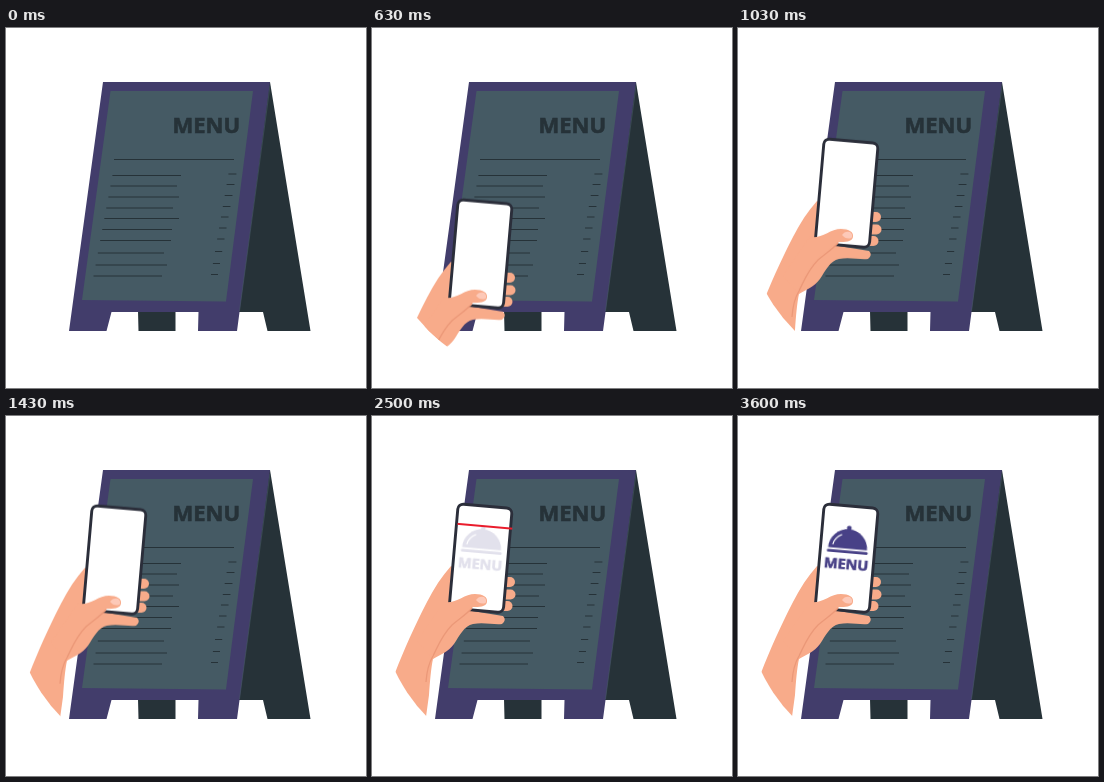
Write an HTML page that moves like this. It is 360x360 px and loops after 4.33 s.

```html
<!DOCTYPE html>
<html lang="en">
<head>
<meta charset="utf-8">
<title>Menu board and phone</title>
<style>
  html, body { margin: 0; width: 100%; height: 100%; overflow: hidden; background: #fff; }
  svg { display: block; width: 100vw; height: 100vh; }
  text { font-family: "Open Sans", "Noto Sans", sans-serif; font-weight: 700; text-anchor: middle; stroke-width: .6; }
</style>
</head>
<body>
<svg viewBox="0 0 360 360">
  <defs>
    <clipPath id="disc"><circle cx="180" cy="180" r="174"/></clipPath>
  </defs>

  <g id="board">
    <path fill="#263238" d="M132 283H169.500V303H132.500ZM262 54H264L304.500 303H261.500L257 284H230Z"/>
    <path fill="#423d6b" d="M97 54H264L231 303H192L192.500 284H105.500L100.500 303H63Z"/>
    <path fill="none" stroke="#455a64" stroke-width=".6" d="M264 58L233.500 283"/>
    <path fill="#455a64" d="M104.500 63H247L220 273.500L76 272Z"/>
    <text x="200.300" y="105" font-size="22" fill="#263238" stroke="#263238">MENU</text>
    <path id="rows" fill="none" stroke="#263238" stroke-width="1"/>
  </g>

  <g clip-path="url(#disc)">
    <g id="hand">
      <g fill="#f8ab8a">
        <path d="M79 150C70 160 62 172 55 186C42 211 32 234 23 257L0 320L50 330L57 279
          C58 265 59 252 61 243C68 239 76 236 82 228C88 219 92 210 101 208
          C112 206 122 209 130 208Q135 204 131 200L100 195L110 170Z"/>
        <rect x="122" y="161" width="21" height="10" rx="5"/>
        <rect x="122" y="173.500" width="21.500" height="10" rx="5"/>
        <rect x="120" y="185" width="20.500" height="10" rx="5"/>
      </g>
      <g transform="translate(108.700 142.200) rotate(5)">
        <rect x="-27.100" y="-52.300" width="54.200" height="104.600" rx="5.500" fill="#fff" stroke="#2b2e3a" stroke-width="2.900"/>
        <g id="dish" fill="#484187">
          <circle cy="-30" r="2.400"/>
          <path d="M-19.500 -9.500A19.500 19.500 0 0 1 19.500 -9.500Z"/>
          <rect x="-20.500" y="-7.800" width="41" height="2.900" rx="1.400"/>
          <path d="M-15 -13A15 15 0 0 1 -7 -23" fill="none" stroke="#fff" stroke-width="1.100" stroke-linecap="round"/>
          <text y="10.500" font-size="14.500" stroke="#484187">MENU</text>
        </g>
        <path id="scan" d="M-27 0H28" stroke="#ea1c2c" stroke-width="1.900"/>
      </g>
      <path fill="#f8ab8a" d="M72 186C84 188 92 178 103 178C111 178 116 181 115 186
        C114 191 107 191 101 191C96 197 88 202 80 209C70 219 66 232 61 243L45 225Z"/>
      <path fill="none" stroke="#eb9878" stroke-width="1.300" d="M100 192C95 198 88 202 80 209C70 219 66 230 61 240Q55 250 54 266"/>
      <path fill="#fdc9b8" d="M104 184Q107 179.500 112 181Q115.500 184 113.500 187Q108 189 104 184Z"/>
    </g>
  </g>
</svg>

<script type="module">
  const LOOP = 4330, ARRIVE = 1670, SCAN_START = 2330, FADE_END = 3390, SCAN_END = 3600;
  const $ = id => document.getElementById(id);

  // Printed rows follow the slant of the board.
  const rowY = [147.500, 158, 169, 180, 190.500, 201.500, 212.500, 225, 237, 248];
  const rowEnd = [175, 171, 173, 167, 173, 166, 165, 158, 161, 156];
  $("rows").setAttribute("d", "M108 131.500H228" + rowY.map((y, i) => {
    const down = (y - 147) / 101;
    const price = 230.500 - 18.500 * down;
    return `M${106.500 - 19 * down} ${y}H${rowEnd[i]}M${price - 8 + down} ${y - 1.500}H${price}`;
  }).join(""));

  // Each step is [time in ms, properties].
  function play(id, steps) {
    $(id).animate(
      steps.map(([time, props]) => ({ offset: time / LOOP, ...props })),
      { duration: LOOP, iterations: Infinity }
    );
  }

  const shift = y => ({ transform: `translate(0px, ${y.toFixed(3)}px)` });
  const scanAt = ([x, y], opacity) => ({ transform: `translate(${x}px, ${y}px)`, opacity });
  const fade = opacity => ({ opacity });

  const rise = Array.from({ length: 41 }, (_, i) => {
    const p = i / 40;
    return [p * ARRIVE, shift(297 * (1 - p) ** 2.67)];
  });
  play("hand", [...rise, [LOOP, shift(0)]]);

  play("dish", [[0, fade(0)], [SCAN_START, fade(0)], [FADE_END, fade(1)], [LOOP, fade(1)]]);

  const scanTop = [1, -38.500], scanBottom = [0, 8.800];
  play("scan", [
    [0, scanAt(scanTop, 0)], [SCAN_START, scanAt(scanTop, 0)],
    [SCAN_START, scanAt(scanTop, 1)], [SCAN_END, scanAt(scanBottom, 1)],
    [SCAN_END, scanAt(scanBottom, 0)], [LOOP, scanAt(scanBottom, 0)]
  ]);
</script>
</body>
</html>
```
